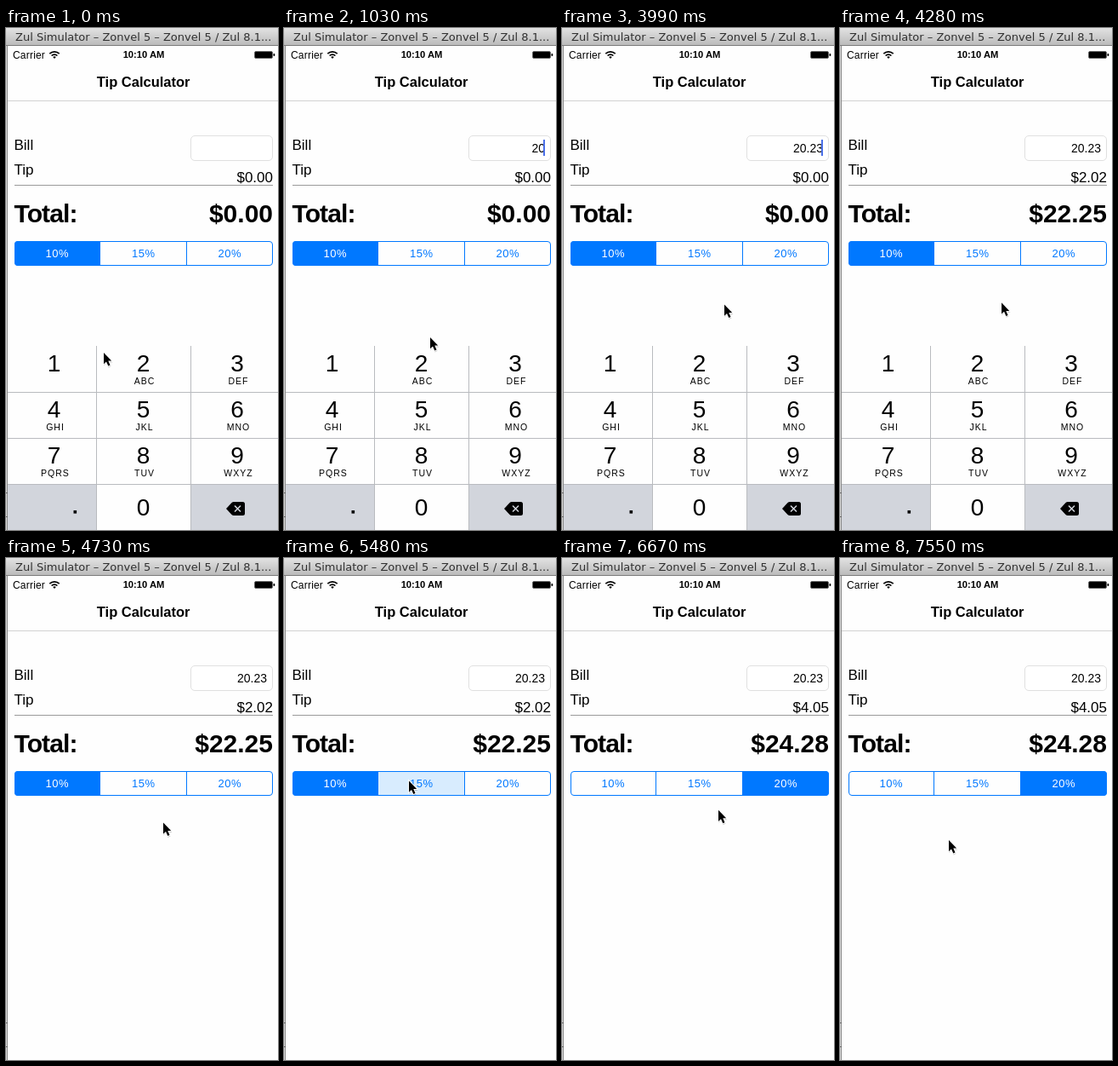
Animation of 320 by 589 pixels, one loop 8 s. Source, as an HTML page:

```html
<!DOCTYPE html>
<html lang="en">
<head>
<meta charset="utf-8">
<title>Tip Calculator</title>
<style>
  html, body { margin: 0; width: 100%; height: 100%; overflow: hidden; background: #fefefe; }
  svg { display: block; width: 320px; height: 589px; }
  text { font-family: "Liberation Sans", Arial, sans-serif; }
  .bold { font-weight: bold; }
  .mid { text-anchor: middle; }
  .end { text-anchor: end; }
  .body { font-size: 17px; }
  .total { font-size: 30px; }
  .segment { font-size: 13px; letter-spacing: .6px; }
  .digit { font-size: 28px; }
  .letters { font-size: 10.5px; letter-spacing: 1px; }
  .window-title { font: 13px "DejaVu Sans", sans-serif; fill: #303030; }
</style>
</head>
<body>
<svg viewBox="0 0 320 589">
  <defs>
    <linearGradient id="chrome" x2="0" y2="1">
      <stop offset="0" stop-color="#e2e2e2"/>
      <stop offset="1" stop-color="#b9b9b9"/>
    </linearGradient>
    <clipPath id="segmentClip"><rect x="10" y="250" width="304" height="29" rx="4"/></clipPath>
  </defs>
  <rect width="320" height="589" fill="#fefefe"/>

  <text x="8" y="35.5" font-size="12" letter-spacing=".2">Carrier</text>
  <g fill="none" stroke="#000" stroke-width="1.7">
    <path d="M51.3 30.2a8.1 8.1 0 0 1 11.4 0M53.6 32.5a4.8 4.8 0 0 1 6.8 0"/>
    <path d="M55.2 34a2.6 2.6 0 0 1 3.6 0L57 36Z" fill="#000" stroke="none"/>
  </g>
  <text class="bold mid" x="162" y="35" font-size="11.2">10:10 AM</text>
  <rect x="292.5" y="27.5" width="21" height="8" rx="1.5" stroke="#666"/>
  <rect x="314.5" y="30" width="1.8" height="3" rx=".7"/>
  <text class="bold mid" x="161.7" y="69" font-size="16.5">Tip Calculator</text>
  <path d="M2 85.5H320" stroke="#d2d2d2"/>

  <text class="body" x="9.5" y="142.5">Bill</text>
  <text class="body" x="9.5" y="171.5">Tip</text>
  <rect x="217.5" y="126.5" width="96" height="29" rx="4.5" fill="#fff" stroke="#e0e0e0"/>
  <text class="end" id="bill" x="307" y="146" font-size="14"></text>
  <rect id="caret" x="305" y="131" width="2" height="19" fill="#4a6fe8"/>
  <text class="body end" id="tip" x="314" y="181"></text>
  <path d="M10 184.5H314" stroke="#9a9a9a"/>
  <text class="bold total" x="9.5" y="228" letter-spacing="-.9">Total:</text>
  <text class="bold total end" id="total" x="314" y="228"></text>

  <g id="segments" clip-path="url(#segmentClip)"></g>
  <g stroke="#0078ff" fill="none">
    <path d="M110.5 250V279M212.5 250V279"/>
    <rect x="10.5" y="250.5" width="303" height="28" rx="3.5"/>
  </g>
  <g id="labels"></g>

  <g id="keyboard">
    <rect x="2" y="373" width="318" height="216" fill="#fefefe"/>
    <path d="M2 536H106V589H2ZM218 536H320V589H218Z" fill="#d2d5dc"/>
    <path d="M106.5 373V589M217.5 373V589M2 427.5H320M2 481.5H320M2 535.5H320" stroke="#b9bbbf"/>
    <g id="keys"></g>
    <rect x="79.5" y="566" width="3.6" height="3.6"/>
    <path d="M259 564L265.5 557Q266.5 556 268 556H278.5Q281 556 281 558.5V569.5Q281 572 278.5 572H268Q266.5 572 265.5 571Z"/>
    <path d="M269 560.5L276 567.5M276 560.5L269 567.5" stroke="#d2d5dc" stroke-width="1.5"/>
  </g>

  <rect width="1" height="589" fill="#dadada"/>
  <rect x="1" width="1" height="589" fill="#8a8a8a"/>
  <path d="M0 545.5H2M0 573.5H2" stroke="#666"/>
  <rect width="320" height="21" fill="url(#chrome)"/>
  <rect y="20" width="320" height="1" fill="#7c7c7c"/>
  <text class="window-title" x="11" y="15">Zul Simulator – Zonvel 5 – Zonvel 5 / Zul 8.1...</text>

  <g id="pointer">
    <path d="M0 1.5V15L3 12.5 5.5 17.5 8.5 16 6.5 11.5H10.5Z" fill="#000" opacity=".2"/>
    <path d="M0 0V13.2L3 10.5 5.3 15.6 7.5 14.6 5.3 9.6H9.2Z" stroke="#fff" stroke-width="1.8" paint-order="stroke"/>
  </g>
</svg>
<script>
const $ = id => document.getElementById(id);
const LOOP = 8000, STEP = 4000 / 27, LEAD = 18;
const BLUE = '#0078ff', PRESSED = '#d8ecfe', PLAIN = '#fefefe';
const KEYBOARD_HEIGHT = 216, SLIDE_STEPS = 3, TRAVEL_STEPS = 4;
const BILL = '20.23';
const percents = [10, 15, 20];

// Event times in steps; the first tap closes the keyboard, the others pick a segment
const keystrokes = [5, 7, 11, 18, 19];
const taps = [29, 38, 43];

// Pointer stops: arrival step, x, y
const stops = [[0, 115, 381], [2, 172, 363], [22, 106, 451], [25, 189.5, 331], [27, 191, 324.5],
  [32, 185, 310.5], [35, 147, 261.5], [41, 268, 267.5], [47, 100, 324], [51, 128, 331]];

const money = value => '$' + value.toFixed(2);
const passed = (times, step) => times.filter(at => step >= at).length;

function ease(k) {
  k = Math.min(1, Math.max(0, k));
  return k * k * (3 - 2 * k);
}

// The caret stays lit after a keystroke, then fades out and in on an eight-step cycle
function caretOpacity(step) {
  const typed = passed(keystrokes, step);
  const phase = (step - (typed ? keystrokes[typed - 1] : -6)) % 8;
  return phase < 4 ? 1 : phase === 4 || phase === 7 ? .5 : 0;
}

function pointerAt(step) {
  let [before, x, y] = stops[0];
  for (const [arrival, nextX, nextY] of stops.slice(1)) {
    const leave = Math.max(before, arrival - TRAVEL_STEPS);
    const k = ease((step - leave) / (arrival - leave));
    x += (nextX - x) * k;
    y += (nextY - y) * k;
    before = arrival;
  }
  return [x, y];
}

function build() {
  const edge = i => Math.round(9.6 + 101.5 * i);
  percents.forEach((percent, i) => {
    $('segments').innerHTML += `<rect x="${edge(i)}" y="250" width="${edge(i + 1) - edge(i)}" height="29"/>`;
    $('labels').innerHTML += `<text class="segment mid" x="${60.3 + 101.5 * i}" y="269">${percent}%</text>`;
  });

  const columns = [56.5, 161.5, 272];
  const key = (digit, x, y, letters) => `<text class="digit mid" x="${x}" y="${y}">${digit}</text>
    <text class="letters mid" x="${x + 1.5}" y="${y + 15}">${letters}</text>`;
  const letters = ' ABC DEF GHI JKL MNO PQRS TUV WXYZ'.split(' ');
  $('keys').innerHTML = letters.map((group, i) =>
    key(i + 1, columns[i % 3], 403 + 54 * Math.floor(i / 3), group)).join('') + key(0, columns[1], 572, '');
}

function draw(ms) {
  const step = Math.floor((ms % LOOP + LEAD) / STEP);
  const closed = step >= taps[0];
  const chosen = Math.max(0, passed(taps, step) - 1);
  const pressed = taps.indexOf(step + 1);
  const bill = BILL.slice(0, passed(keystrokes, step));
  const amount = closed ? Number(bill) : 0;
  const tip = amount * percents[chosen] / 100;

  $('bill').textContent = bill;
  $('caret').setAttribute('opacity', closed ? 0 : caretOpacity(step));
  $('tip').textContent = money(tip);
  $('total').textContent = money(amount + tip);
  percents.forEach((_, i) => {
    const fill = i === chosen ? BLUE : i === pressed ? PRESSED : PLAIN;
    $('segments').children[i].setAttribute('fill', fill);
    $('labels').children[i].setAttribute('fill', i === chosen ? '#fff' : BLUE);
  });

  const slide = KEYBOARD_HEIGHT * ease((step - taps[0]) / SLIDE_STEPS);
  $('keyboard').setAttribute('transform', `translate(0 ${slide})`);
  $('pointer').setAttribute('transform', `translate(${pointerAt(step)})`);
}

build();
const start = performance.now();
function tick() {
  draw(performance.now() - start);
  requestAnimationFrame(tick);
}
tick();
</script>
</body>
</html>
```
